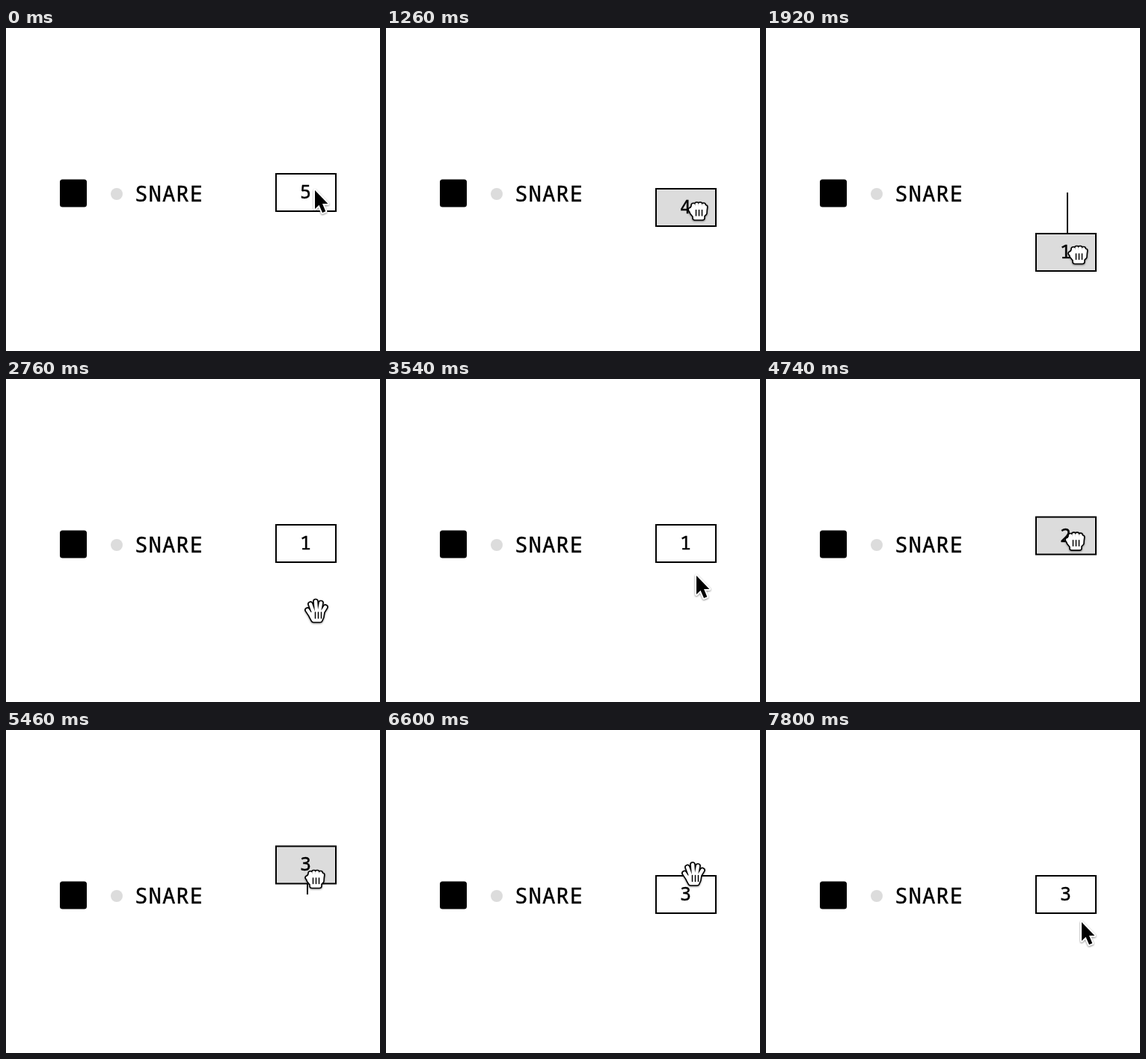
These frames come from a looping animation (500x432 px, 8 s). An HTML page:

```html
<!DOCTYPE html>
<html lang="en">
<head>
<meta charset="utf-8">
<title>Drag to change a number</title>
<style>
  html, body { margin: 0; width: 100%; height: 100%; overflow: hidden; background: #fff; }
  svg { display: block; width: 100%; height: 100%; }
  text { font-family: "Noto Sans Mono", "DejaVu Sans Mono", monospace; stroke: #000; stroke-width: .45; }
  .cursor { filter: drop-shadow(0 1.5px 1.2px rgba(0, 0, 0, .45)); stroke-linecap: round; stroke-linejoin: round; }
  .edge { fill: #000; stroke: #000; stroke-width: 7.6; }
  .skin { fill: #fff; stroke: #fff; stroke-width: 4.4; }
  .crease { fill: none; stroke: #000; stroke-width: 1.5; }
</style>
</head>
<body>
<svg viewBox="0 0 500 432">
  <defs>
    <path id="openShape" d="M-6 8L-12-1M-4 2L-8-9M0 0L-1-12.5M4 0L6-10.5M7 3L12-5M-6 4L8 2L7 8L5 12.5H-4L-7 7Z"/>
    <path id="grabShape" d="M-5 5L-9.8-1.5M-6-1V-7.2M-1.5-1V-8.5M3-1V-8.5M7.5-1V-7.5M9 1L9.8-5M-7-4H9.5L9 3L6 6V9.5H-4V7L-8 2Z"/>
  </defs>

  <rect x="72" y="202.6" width="36" height="36.8" rx="3.5"/>
  <circle cx="148" cy="222" r="8" fill="#dcdcdc"/>
  <text x="172" y="232" font-size="29" letter-spacing="1.05">SNARE</text>

  <line id="thread" x1="403" x2="403" y1="220" y2="220" stroke="#000" stroke-width="2"/>
  <g id="field">
    <rect id="box" x="361" y="195" width="80" height="50" stroke="#000" stroke-width="2"/>
    <text id="digit" x="400.5" y="228" font-size="25" text-anchor="middle"></text>
  </g>

  <g id="arrow" class="cursor">
    <path d="M0 0V25L5.5 19.8L10 30L14.3 28.2L10 18H17.3Z" stroke="#fff" stroke-width="4" paint-order="stroke"/>
  </g>
  <g id="open" class="cursor">
    <use href="#openShape" class="edge"/>
    <use href="#openShape" class="skin"/>
    <path class="crease" d="M-1.5 2v8M2.5 2v8M6.5 2v8"/>
  </g>
  <g id="grab" class="cursor">
    <use href="#grabShape" class="edge"/>
    <use href="#grabShape" class="skin"/>
    <path class="crease" d="M-2.5-1v7.5M1.5-1v7.5M5.5-1v7.5"/>
  </g>
</svg>

<script>
const LOOP = 8000, TICK = 60, STEP = 20, SNAP = 130;
const $ = id => document.getElementById(id);
const [thread, field, box, digit] = ["thread", "field", "box", "digit"].map($);
const cursors = { arrow: $("arrow"), open: $("open"), grab: $("grab") };

// Cursor stops: time, kind, x, y
const stops = [
  [0, "arrow", 413, 217], [300, "arrow", 413, 217],
  [360, "open", 414, 221], [420, "open", 415, 223],
  [780, "grab", 415, 223], [1080, "grab", 415, 223], [1260, "grab", 415, 243],
  [1920, "grab", 415, 301.5], [2040, "grab", 415, 310],
  [2520, "open", 415, 310],
  [2820, "arrow", 413, 292], [3300, "arrow", 413, 292], [3420, "arrow", 417, 299],
  [3540, "arrow", 415, 263], [3600, "arrow", 415, 251],
  [3660, "open", 414, 242], [3960, "open", 411, 226.5],
  [4260, "grab", 411, 226.5], [4500, "grab", 411, 226], [4920, "grab", 411, 207],
  [5100, "grab", 411, 207], [5160, "grab", 411, 206], [5280, "grab", 411, 206],
  [5460, "grab", 411, 197.5], [5640, "grab", 411, 193],
  [6060, "open", 411, 192.5], [6780, "open", 411, 192.5],
  [7080, "open", 415, 230],
  [7380, "arrow", 419, 240], [7500, "arrow", 425, 257], [7740, "arrow", 425, 257],
  [7800, "arrow", 422, 257]
];

// Each drag holds the field from press to release; the field snaps one step at a time
const drags = [
  { press: 720, release: 2760, dir: 1, snaps: [1125, 1360, 1575, 1790] },
  { press: 4200, release: 6600, dir: -1, snaps: [4700, 5350] }
];

const easeOut = p => 1 - (1 - p) ** 2;
const clamp = p => Math.min(1, Math.max(0, p));

function cursorAt(t) {
  const i = stops.findLastIndex(s => s[0] <= t);
  const [t0, kind, x, y] = stops[i];
  const next = stops[i + 1];
  if (!next || next[1] !== kind) return { kind, x, y };
  const p = (t - t0) / (next[0] - t0);
  return { kind, x: x + (next[2] - x) * p, y: y + (next[3] - y) * p };
}

function fieldAt(t) {
  let value = 5, shift = 0, held = false;
  for (const { press, release, dir, snaps } of drags) {
    const active = t >= press && t < release;
    held = held || active;
    for (const start of snaps) {
      if (t < start) continue;
      value -= dir;
      if (active) shift += dir * STEP * easeOut(clamp((t - start) / SNAP));
    }
  }
  return { value, shift, held };
}

function draw(time) {
  const t = Math.floor((time % LOOP) / TICK) * TICK;
  const { value, shift, held } = fieldAt(t);
  field.setAttribute("transform", `translate(0 ${shift.toFixed(2)})`);
  thread.setAttribute("y2", 220 + shift);
  box.setAttribute("fill", held ? "#dcdcdc" : "#fff");
  digit.textContent = value;

  const { kind, x, y } = cursorAt(t);
  for (const name in cursors) cursors[name].style.display = name === kind ? "" : "none";
  const [dx, dy] = kind === "grab" ? [2, 1.5] : [0, 0];
  cursors[kind].setAttribute("transform", `translate(${x + dx} ${y + dy})`);
}

const begin = performance.now();
function tick() {
  draw(performance.now() - begin);
  requestAnimationFrame(tick);
}
tick();
</script>
</body>
</html>
```
